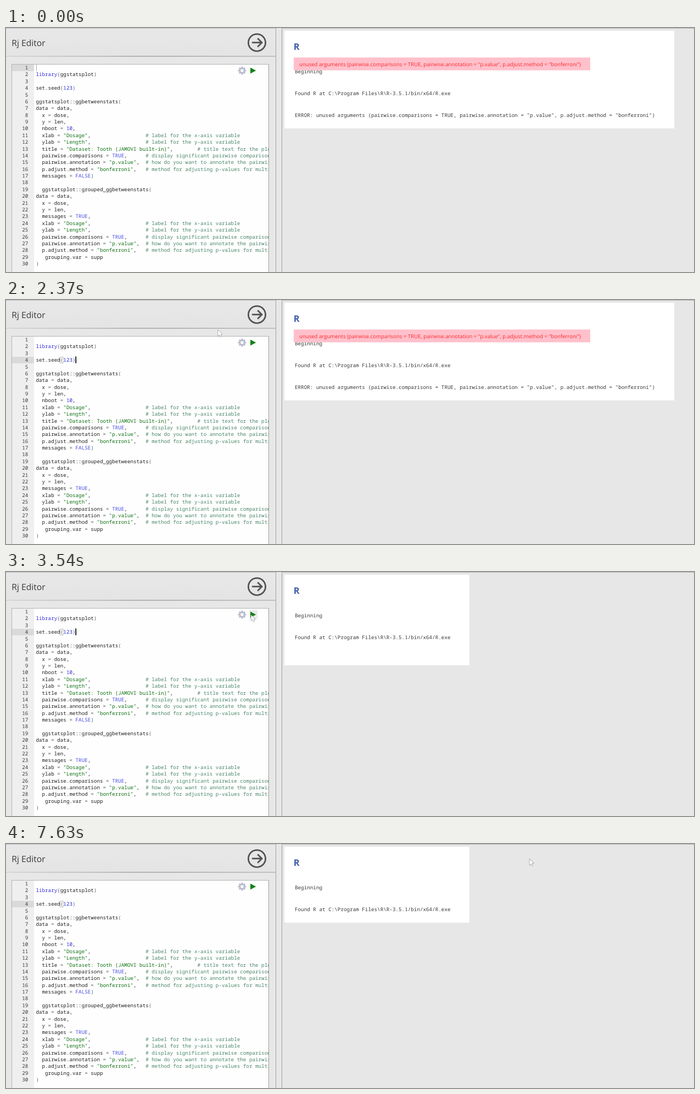
Write an HTML page with a canvas that moves like this. It is 1253 px wide and 447 px high and loops after 8 s.

```html
<!DOCTYPE html>
<html lang="en">
<head>
<meta charset="utf-8">
<title>Rj Editor</title>
<style>
html, body { margin: 0; width: 100%; height: 100%; overflow: hidden; background: #e7e7e7; }
canvas { display: block; }
</style>
</head>
<body>
<canvas id="stage" width="1253" height="447"></canvas>
<script>
const ctx = document.getElementById('stage').getContext('2d');
const LOOP = 8000;
const SANS = '"Open Sans", "Noto Sans", sans-serif';
const MONO = '"Noto Sans Mono", "DejaVu Sans Mono", monospace';
const COL = 5.55, ROW = 12.38, CODE_X = 54.4, CODE_Y = 66.7;

const CODE = `
library(ggstatsplot)

set.seed(123)

ggstatsplot::ggbetweenstats(
data = data,
  x = dose,
  y = len,
  nboot = 10,
  xlab = "Dosage",                  # label for the x-axis variable
  ylab = "Length",                  # label for the y-axis variable
  title = "Dataset: Tooth (JAMOVI built-in)",        # title text for the plot
  pairwise.comparisons = TRUE,      # display significant pairwise comparisons
  pairwise.annotation = "p.value",  # how do you want to annotate the pairwise
  p.adjust.method = "bonferroni",   # method for adjusting p-values for multiple
  messages = FALSE)

  ggstatsplot::grouped_ggbetweenstats(
data = data,
  x = dose,
  y = len,
  messages = TRUE,
  xlab = "Dosage",                  # label for the x-axis variable
  ylab = "Length",                  # label for the y-axis variable
  pairwise.comparisons = TRUE,      # display significant pairwise comparisons
  pairwise.annotation = "p.value",  # how do you want to annotate the pairwise
  p.adjust.method = "bonferroni",   # method for adjusting p-values for multiple
   grouping.var = supp
)`.split('\n');

const ERROR = 'unused arguments (pairwise.comparisons = TRUE, pairwise.annotation = "p.value", p.adjust.method = "bonferroni")';

const TOKEN = /#.*|"[^"]*"|[()=]|:+|[\w.]+|,/g;

const CLICK = 1050, CLEARED = 3300;

// Caret visibility flips at each of these times, starting with "on".
const BLINKS = [CLICK, 1510, 1910, 2530, 3060, 3710, 4080, 4620, 5000, 5630, 6010, 6640, 7020, 7630];

// Pointer moves: start, end, number of steps, Bezier control points.
const MOVES = [
  [70, 810, 11, [[1145, 438], [720, 330], [300, 150], [156, 113]]],
  [980, 1270, 5, [[156, 113], [176, 122], [150, 110], [135.5, 91.5]]],
  [2140, 2910, 11, [[135.5, 91.5], [380, 30], [640, 55], [447, 79]]],
  [3060, 3060, 1, [[447, 79], [446, 78]]],
  [3850, 4160, 5, [[446, 78], [490, 74], [530, 78], [543, 83]]],
  [4620, 4700, 2, [[543, 83], [570, 66], [595, 60]]],
  [5000, 5310, 5, [[595, 60], [900, -10], [1292, 5], [953, 27]]]
];

function bezier(points, u) {
  while (points.length > 1) {
    points = points.slice(1).map((p, i) => p.map((v, k) => points[i][k] + (v - points[i][k]) * u));
  }
  return points[0];
}

function pointerAt(t) {
  if (t < 70 || (t >= 1760 && t < 2140)) return null;
  const [start, end, steps, points] = MOVES.filter(m => m[0] <= t).pop();
  const gap = (end - start) / Math.max(1, steps - 1);
  const step = t >= end ? steps : Math.floor((t - start) / gap) + 1;
  return bezier(points, start === 70 ? (step - 1) / (steps - 1) : step / steps);
}

function box(x, y, w, h, fill) {
  ctx.fillStyle = fill;
  ctx.fillRect(x, y, w, h);
}

function text(str, x, y, font, fill, align = 'left') {
  ctx.font = font;
  ctx.fillStyle = fill;
  ctx.textAlign = align;
  ctx.fillText(str, x, y);
}

function trace(points, close) {
  ctx.beginPath();
  points.forEach(([x, y]) => ctx.lineTo(x, y));
  if (close) ctx.closePath();
}

function tokenColor(s) {
  if (s[0] === '#') return '#4c886b';
  if (s[0] === '"') return '#0f7214';
  if (s === 'library') return '#3434d8';
  if (/^(TRUE|FALSE)$/.test(s)) return '#4a4ee8';
  if (/^\d+$/.test(s)) return '#2c2cd6';
  if (/^[()=]/.test(s)) return '#5c6876';
  return '#222';
}

function drawHeader() {
  const shade = ctx.createLinearGradient(0, 0, 0, 51);
  shade.addColorStop(0, '#e8e8e8');
  shade.addColorStop(1, '#e4e4e4');
  box(0, 0, 491, 51, shade);
  const rule = ctx.createLinearGradient(0, 0, 491, 0);
  rule.addColorStop(0, '#d2d2d2');
  rule.addColorStop(0.5, '#a2a2a2');
  rule.addColorStop(1, '#b4b4b4');
  box(0, 51, 491, 1.5, rule);
  text('Rj Editor', 10.2, 33.2, '15.7px ' + SANS, '#3a3a3a');

  ctx.strokeStyle = '#525252';
  ctx.lineWidth = 2.8;
  ctx.beginPath();
  ctx.arc(457, 26.7, 15.6, 0, Math.PI * 2);
  ctx.stroke();
  trace([[448, 26.7], [465.5, 26.7]]);
  ctx.stroke();
  trace([[458.2, 18.9], [466, 26.7], [458.2, 34.5]]);
  ctx.stroke();
}

function drawGear(x, y) {
  ctx.save();
  ctx.translate(x, y);
  ctx.fillStyle = ctx.strokeStyle = '#b9bccd';
  for (let i = 0; i < 8; i++) {
    ctx.fillRect(-1.5, -7.3, 3, 3);
    ctx.rotate(Math.PI / 4);
  }
  ctx.lineWidth = 3;
  ctx.beginPath();
  ctx.arc(0, 0, 4.2, 0, Math.PI * 2);
  ctx.stroke();
  ctx.restore();
}

function drawEditor(t, pointer) {
  box(10, 66, 469, 381, '#b4b4b4');
  box(478, 66, 1, 381, '#a0a0a0');
  box(11, 67, 467, 380, '#fefefe');
  box(11, 67, 40, 380, '#efefef');
  const active = t < CLICK ? 0 : 3;
  box(11, Math.round(CODE_Y + active * ROW), 40, 12, '#dadada');

  ctx.save();
  ctx.beginPath();
  ctx.rect(11, 66, 467, 381);
  ctx.clip();
  const font = '9.25px ' + MONO;
  CODE.forEach((line, i) => {
    const y = CODE_Y + i * ROW + 9.3;
    text(i + 1, 40.3, y, font, '#3a3a3a', 'right');
    for (const m of line.matchAll(TOKEN)) {
      text(m[0], CODE_X + m.index * COL, y, font, tokenColor(m[0]));
    }
  });
  ctx.restore();

  if (t < CLICK) {
    box(55, 67, 1, 12, '#aaa');
  } else {
    ctx.strokeStyle = '#c4c4c4';
    ctx.lineWidth = 1;
    ctx.strokeRect(98.5, 104.5, 6, 11);
    if (BLINKS.filter(b => b <= t).length % 2) box(126.4, 103.5, 1.7, 12.3, '#000');
  }

  const hover = pointer && Math.abs(pointer[0] - 450) < 8 && Math.abs(pointer[1] - 78) < 8;
  if (hover) box(443, 70, 15, 16, '#ebebeb');
  drawGear(430, 78);
  ctx.fillStyle = '#188218';
  trace([[445, 72.5], [455.3, 78], [445, 83.5]], true);
  ctx.fill();
}

function drawResults(t) {
  let w = 710, h = 179;
  if (t >= 3540) {
    w = 337;
    h = t < 3710 ? 166 : t < 3850 ? 143 : 139;
  }
  box(507, 5, w, h, '#fff');
  text('R', 523.8, 40, 'bold 16.4px ' + SANS, '#3e5ba9');

  const font = '9.27px ' + MONO;
  text('Beginning', 526, 83, font, '#3a3a3a');
  text('Found R at C:\\Program Files\\R\\R-3.5.1/bin/x64/R.exe', 526, 123, font, '#3a3a3a');
  if (t < CLEARED) {
    text('ERROR: ' + ERROR, 526, 163, font, '#3a3a3a');
    box(524, 54, 540, 23.5, '#ffc0cb');
    text(ERROR, 534, 69.7, '9.61px ' + SANS, '#fb2a30');
  }
}

function drawPointer([x, y]) {
  const overCode = x > 51 && x < 478 && y > 67 && !(x > 422 && y < 90);
  ctx.save();
  ctx.translate(x, y);
  ctx.lineWidth = 1;
  if (overCode) {
    ctx.strokeStyle = '#333';
    trace([[0, -5], [0, 5]]);
    ctx.stroke();
    for (const end of [-5, 5]) {
      trace([[-2.5, end], [2.5, end]]);
      ctx.stroke();
    }
  } else {
    trace([[0.4, 0.4], [0.4, 11.4], [2.9, 9.1], [4.6, 13], [6.4, 12.2], [4.7, 8.4], [8, 8.2]], true);
    ctx.fillStyle = '#fff';
    ctx.strokeStyle = '#555';
    ctx.lineWidth = 0.9;
    ctx.stroke();
    ctx.fill();
  }
  ctx.restore();
}

function draw(t) {
  const pointer = pointerAt(t);
  box(0, 0, 1253, 447, '#e7e7e7');
  drawHeader();
  drawEditor(t, pointer);
  box(491, 0, 1, 447, '#a0a0a0');
  box(502, 0, 1, 447, '#a0a0a0');
  box(0, 0, 491, 1, '#bdbdbd');
  box(502, 0, 751, 1, '#b0b0b0');
  drawResults(t);
  if (pointer) drawPointer(pointer);
}

ctx.textRendering = 'geometricPrecision';
const began = performance.now();
function tick() {
  draw((performance.now() - began) % LOOP);
  requestAnimationFrame(tick);
}
tick();
</script>
</body>
</html>
```
